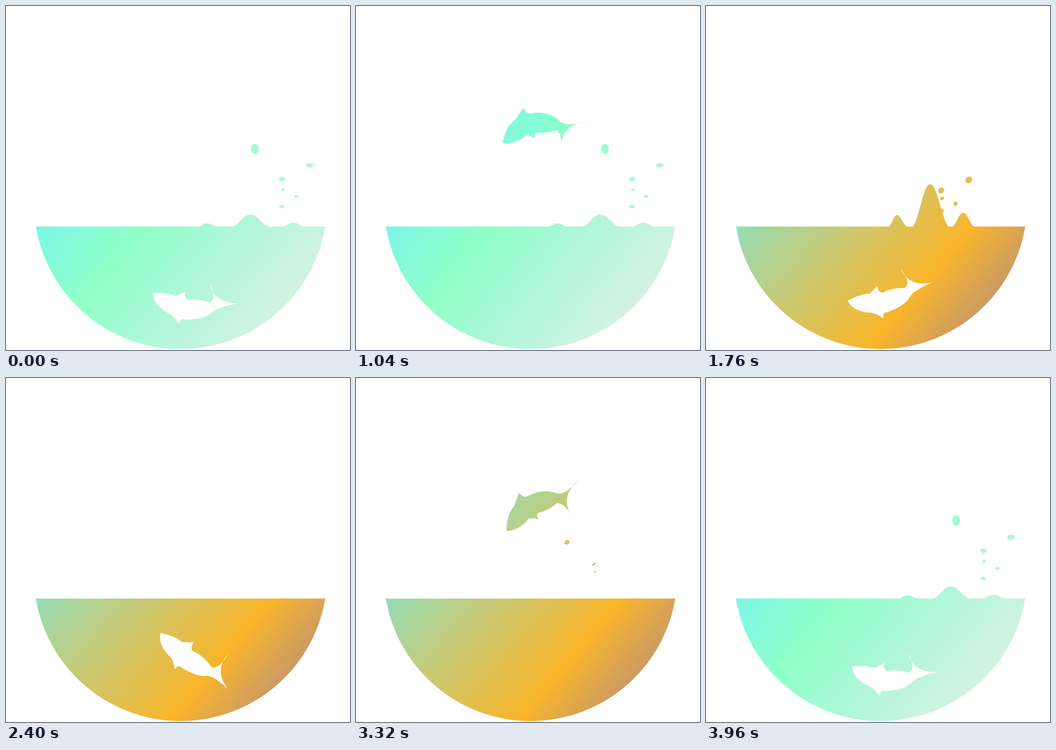
Animation of 748 by 748 pixels, one loop 4000 ms. Source, as an HTML page with a canvas:

```html
<!DOCTYPE html>
<html lang="en">
<head>
<meta charset="utf-8">
<title>Leaping fish</title>
<style>
  html, body { margin: 0; width: 100%; height: 100%; overflow: hidden; background: #fff; }
  canvas { display: block; width: 748px; height: 748px; }
</style>
</head>
<body>
<canvas id="stage" width="748" height="748"></canvas>
<script>
const ctx = document.getElementById('stage').getContext('2d');
const SIZE = 748, WATER = 479.6, RAD = Math.PI / 180;
const JUMP = 2000, APEX = 1020, IMPACT = 1520;
const LEAP_CREST = 1000, DIVE_CREST = 1960;

const clamp = v => Math.max(0, Math.min(1, v));
const smooth = v => { const u = clamp(v); return u * u * (3 - 2 * u); };

function gradient(stops) {
  const g = ctx.createLinearGradient(277, 237, 721, 617);
  stops.forEach(([at, color]) => g.addColorStop(at, color));
  return g;
}
const palettes = [
  gradient([[0, '#7cf7e6'], [.3, '#8fffc8'], [.64, '#b6f5dc'], [.9, '#d4f2e2']]),
  gradient([[0, '#97dbb4'], [.33, '#cbc870'], [.663, '#f9b52b'], [.88, '#cd9c63']])
];

// Straight fish, nose first, then a control point and an end point per curve.
const outline = [
  [-81, -2],
  [-54, -22], [-31, -23],   // forehead
  [-19, -32], [-9, -38],    // back fin
  [-9, -23], [2, -21],
  [30, -24], [56, -6],      // back
  [74, 0], [95, -38],       // tail
  [63, 1], [95, 39],
  [73, 16], [54, 15],
  [36, 26], [2, 22],        // belly
  [-9, 20], [-8, 34],       // belly fin
  [-16, 24], [-27, 19],
  [-66, 20], [-81, -2]      // jaw
];

// offset, height, left width, right width
const waves = [[-1, 25, 17, 21], [0, 92, 37, 40], [1, 30, 23, 23]];

// x, y, rx, ry at the crest; the first three linger
const drops = [
  [544, 310, 8.5, 11.5], [603, 376, 7, 5], [605, 399, 4.5, 3],
  [663, 346, 8, 5.5], [634, 414, 5, 3.2], [603, 436, 6, 4]
];

// The body arches with its depth and noses along its climb.
function swimPose(t) {
  const d = t - APEX;
  const depth = Math.tanh((Math.abs(d) - 495) / 135);
  const climb = -Math.sign(d) * (1 - depth * depth);
  const turn = 2 * Math.PI * t / JUMP, sin = Math.sin(turn), cos = Math.cos(turn);
  return {
    x: 389 + 4 * sin + 2 * cos,
    y: 457 + 203 * depth + 4 * (1 + depth) * sin,
    angle: (24 * sin + 10.8 * cos + 22 * climb - 2.8) * RAD,
    bend: -(30 * depth + 25 * cos) * RAD
  };
}

function drawFish(t) {
  const { x, y, angle, bend } = swimPose(t);
  const c = Math.cos(angle), s = Math.sin(angle);
  const place = ([along, across]) => {
    const k = (bend || 1e-4) / 83 * (along < 0 ? .65 : 1), a = along * k;
    const px = Math.sin(a) / k - across * Math.sin(a);
    const py = (1 - Math.cos(a)) / k + across * Math.cos(a);
    return [x + px * c - py * s, y + px * s + py * c];
  };
  const pts = outline.map(place);
  ctx.beginPath();
  ctx.moveTo(...pts[0]);
  for (let i = 1; i < pts.length; i += 2) ctx.quadraticCurveTo(...pts[i], ...pts[i + 1]);
  ctx.fill();
}

function drawWaves(dt) {
  const swell = smooth((dt + 480) / 280)
    * (1 - .71 * smooth((dt + 200) / 200) - .29 * smooth((dt - 20) / 240));
  if (swell < .005) return;
  const center = 532 + .225 * Math.min(dt, 0) - .025 * Math.max(dt, 0);
  const spread = 72 + 22 * clamp((dt + 200) / 200);
  const round = .4 * clamp((dt + 400) / 200);
  for (const [offset, height, left, right] of waves) {
    const x = center + offset * spread, h = height * swell;
    const top = WATER - h, foot = WATER - h * .22;
    ctx.beginPath();
    ctx.moveTo(x - left, WATER);
    ctx.bezierCurveTo(x - left * .6, foot, x - left * round, top, x, top);
    ctx.bezierCurveTo(x + right * round, top, x + right * .6, foot, x + right, WATER);
    ctx.lineTo(x + right, WATER + 2);
    ctx.lineTo(x - left, WATER + 2);
    ctx.fill();
  }
}

function drawEllipse(x, y, rx, ry, tilt = 0) {
  ctx.beginPath();
  ctx.ellipse(x, y, rx, ry, tilt * RAD, 0, 2 * Math.PI);
  ctx.fill();
}

function drawDrops(dt, linger) {
  const shift = .46 * Math.min(dt, 0) - 95 * smooth(dt / 400);
  const lift = 1 - (dt < 0 ? 6.1e-6 : 2.7e-6) * dt * dt;
  const stretch = 1 - .0012 * dt;
  const tilt = dt < 0 ? .225 * dt : -.1 * dt;
  drops.forEach(([x, y, rx, ry], i) => {
    const age = clamp(dt / (i < 3 ? linger : 300));
    const size = smooth((dt + (i ? 340 : 150)) / 140) * (1 - age * age);
    if (size > .02) {
      drawEllipse(x + shift, WATER - (WATER - y) * lift, rx * size, ry * size * stretch, tilt);
    }
  });
}

function drawSplash(t, crest, linger) {
  const dt = (t - crest + JUMP * 1.5) % JUMP - JUMP / 2;
  drawWaves(dt);
  drawDrops(dt, linger);
}

function drawBowl() {
  const cx = 379.6, cy = 427, r = 319, tilt = Math.asin((WATER - cy) / r);
  ctx.beginPath();
  ctx.arc(cx, cy, r, tilt, Math.PI - tilt);
  ctx.fill();
}

function render(now) {
  const lap = Math.floor(now / JUMP) % 2, t = now % JUMP;

  ctx.globalCompositeOperation = 'source-over';
  ctx.clearRect(0, 0, SIZE, SIZE);
  ctx.fillStyle = '#000';
  drawBowl();
  drawSplash(t, LEAP_CREST, 580);
  drawSplash(t, DIVE_CREST, 400);

  // The fish is solid in the air and a hole in the water.
  ctx.globalCompositeOperation = 'xor';
  drawFish(t);

  ctx.globalCompositeOperation = 'source-in';
  ctx.fillStyle = palettes[lap];
  ctx.fillRect(0, 0, SIZE, SIZE);

  // The next palette spreads from the point of impact.
  if (t > IMPACT) {
    const u = clamp((t - IMPACT) / 350), radius = 391 * u * (2 - u);
    ctx.globalCompositeOperation = 'source-atop';
    ctx.fillStyle = palettes[1 - lap];
    drawEllipse(420, 450, radius, radius);
  }
  requestAnimationFrame(render);
}
requestAnimationFrame(render);
</script>
</body>
</html>
```
